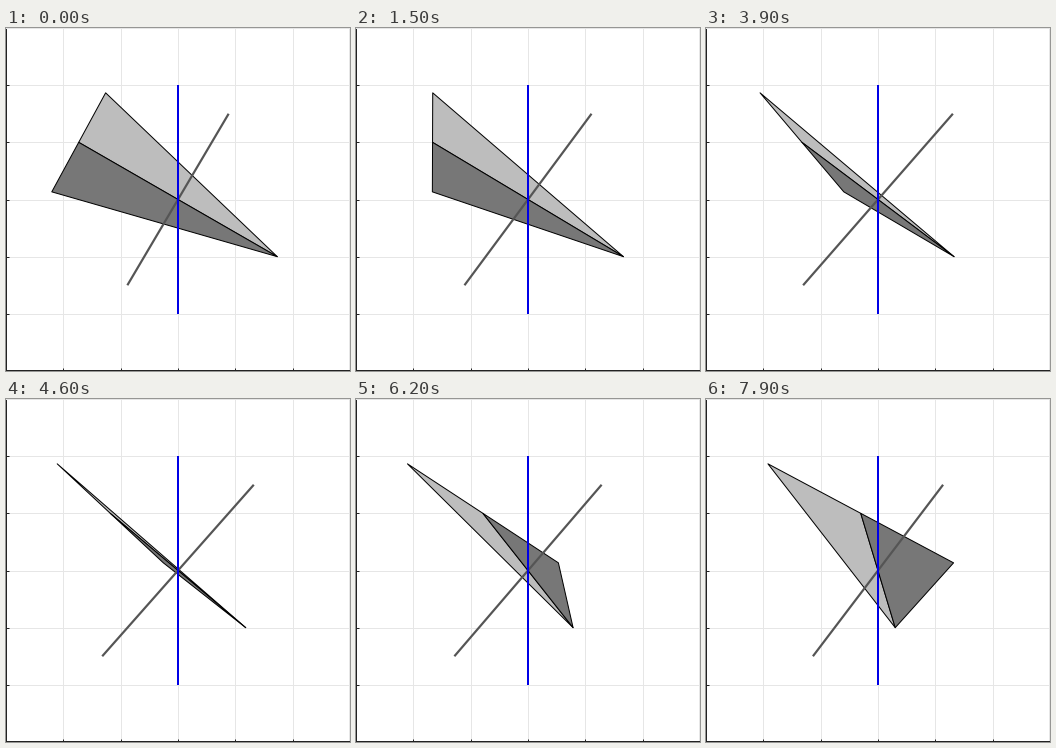
These frames come from a looping animation (344x343 px, 8 s). A matplotlib script:

```python
import numpy as np
import matplotlib.pyplot as plt
from matplotlib.animation import FuncAnimation

W, H, DPI = 344, 343, 100
FRAMES, INTERVAL = 80, 100
PX = 72 / DPI
GRID, INK = "#e6e6e6", "#222222"

# Orthogonal frame tilted 30 degrees: median, half base and normal of the triangle
S3 = np.sqrt(3)
tip = np.array([S3, -1, 0])
half_base = np.array([0.5, S3 / 2, -S3])
normal = np.array([S3 / 2, 1.5, 1])
mid = -tip
top, low = mid + half_base, mid - half_base


def project(points, angle):
    """Spin points about the vertical axis and drop the depth."""
    x, y, z = np.transpose(points)
    return np.column_stack([x * np.cos(angle) + z * np.sin(angle), y])


fig = plt.figure(figsize=(W / DPI, H / DPI), dpi=DPI, facecolor="white")
ax = fig.add_axes([0, 0, 1, 1])
ax.set(xlim=(-3, 3), ylim=(-3, 3))
ticks = range(-2, 3)
ax.set_xticks(ticks)
ax.set_yticks(ticks)
ax.tick_params(direction="in", length=3 * PX, width=PX, color=INK,
               labelbottom=False, labelleft=False)
ax.grid(color=GRID, linewidth=PX)
ax.set_axisbelow(True)
for side, spine in ax.spines.items():
    spine.set_linewidth(2 * PX)
    spine.set_edgecolor(INK if side in ("left", "bottom") else GRID)


def add_face(color):
    return ax.fill([0, 0, 0], [0, 0, 0], facecolor=color, edgecolor="black",
                   linewidth=PX, joinstyle="round", zorder=3)[0]


faces = [(add_face("#bdbdbd"), (top, mid, tip)),
         (add_face("#777777"), (mid, low, tip))]
rod, = ax.plot([], [], color="#555555", linewidth=2.2 * PX,
               solid_capstyle="butt", zorder=4)
ax.plot([0, 0], [-2, 2], color="#0000e6", linewidth=2 * PX,
        solid_capstyle="butt", zorder=5)


def draw(i):
    angle = np.radians(i + 1)
    for face, corners in faces:
        face.set_xy(project(corners, angle))
    rod.set_data(*project((-normal, normal), angle).T)
    return [face for face, _ in faces] + [rod]


anim = FuncAnimation(fig, draw, frames=FRAMES, interval=INTERVAL,
                     repeat=True, repeat_delay=0)
plt.show()
```
